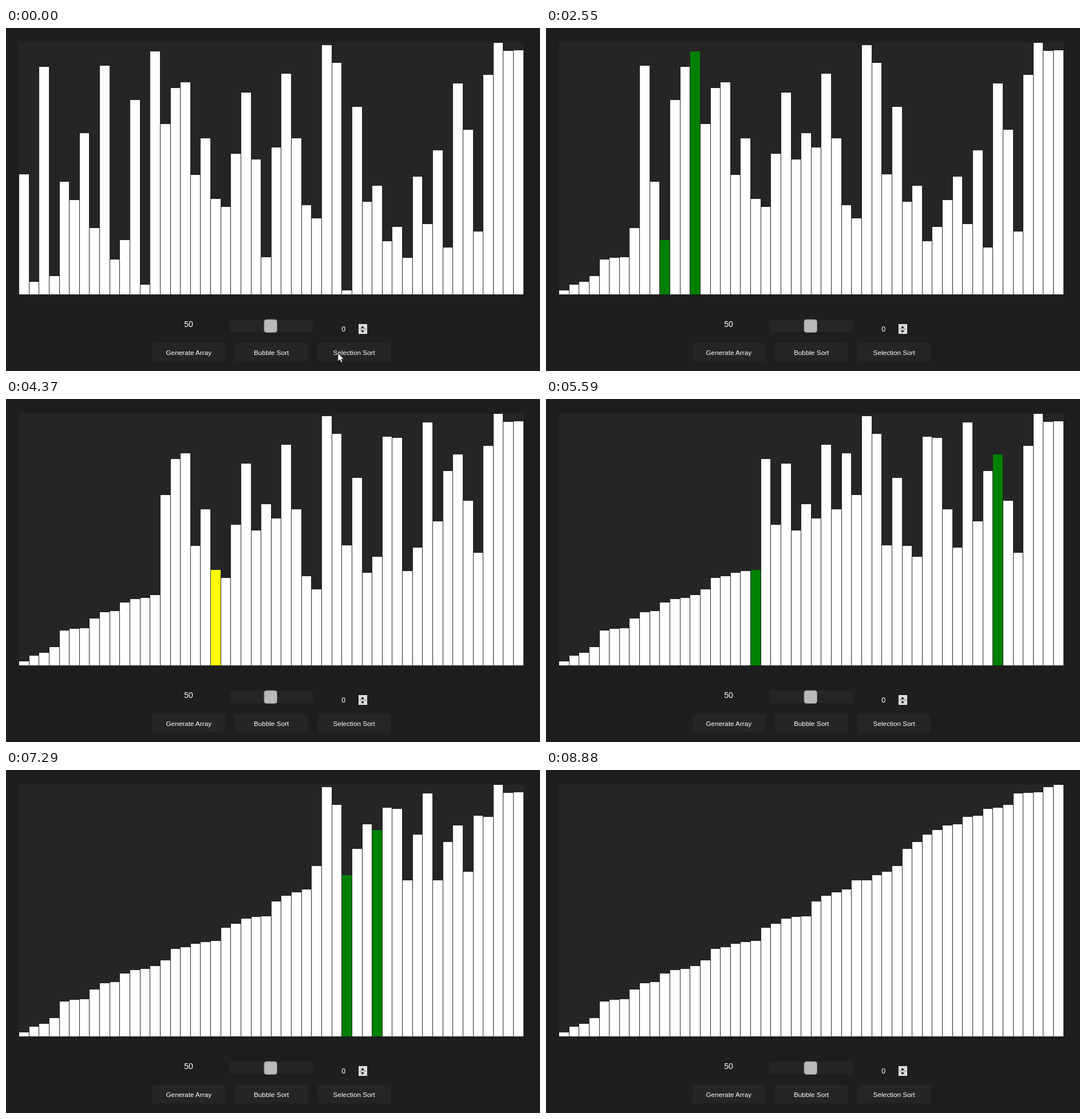
An HTML page that plays this animation: 933 by 600 pixels, repeating every 9080 ms.

```html
<!DOCTYPE html>
<html lang="en">
<head>
<meta charset="utf-8">
<title>Selection sort</title>
<style>
  html, body { margin: 0; width: 100%; height: 100%; overflow: hidden; background: #1e1e1e; }
  svg { display: block; width: 933px; height: 600px; }
  text { font-family: "Liberation Sans", Arial, sans-serif; font-size: 11.76px; fill: #fff; text-anchor: middle; }
  .crisp { shape-rendering: crispEdges; }
</style>
</head>
<body>
<svg viewBox="0 0 933 600">
  <rect width="933" height="600" fill="#1e1e1e"/>
  <g class="crisp" fill="#252525">
    <rect x="23" y="25" width="882" height="441"/>
    <rect x="391" y="510" width="145" height="22"/>
    <rect x="256" y="551" width="127" height="32"/>
    <rect x="400" y="551" width="127" height="32"/>
    <rect x="545" y="551" width="127" height="32"/>
  </g>
  <g id="bars" class="crisp"></g>

  <text x="319" y="523" style="font-size:14.1px">50</text>
  <rect x="451" y="510" width="22.5" height="22.5" rx="4" fill="#bababa" stroke="#858585"/>
  <text x="589.7" y="531" style="font-size:12.5px">0</text>

  <g class="crisp">
    <rect x="616" y="518" width="15" height="17" fill="#f0f0f0"/>
    <rect x="617" y="519" width="13" height="15" fill="#d8d8d8"/>
    <rect x="617" y="526" width="13" height="1" fill="#8a8a8a"/>
  </g>
  <path d="M620 525L623 521L626 525ZM620 529L623 533L626 529Z" fill="#111"/>

  <text x="319.3" y="572">Generate Array</text>
  <text x="463.7" y="572">Bubble Sort</text>
  <text x="608.2" y="572">Selection Sort</text>
  <path id="cursor" d="M580 568.5V583L583.3 580L585.7 585.2L588 584.2L585.7 579.2H590.2Z"
        fill="#fff" stroke="#111" stroke-width=".7"/>
</svg>
<script>
const LOOP = 9080, START = 230, END = 8880, BASE = 466;

// Top edge of each bar before sorting
const tops = [
  256, 444, 68, 434, 269, 301, 184, 350, 66, 405,
  371, 126, 449, 41, 168, 105, 95, 257, 193, 299,
  313, 220, 113, 230, 401, 209, 80, 193, 310, 333,
  30, 61, 459, 138, 304, 276, 373, 348, 402, 260,
  343, 214, 384, 97, 178, 356, 82, 26, 40, 39
];
const count = tops.length;

// Every visible state of the sort
function record(list) {
  const a = list.slice(), out = [];
  const add = (kind, i, j, marks) => out.push({ kind, i, j, marks, a: a.slice() });
  for (let i = 0; i < count - 1; i++) {
    let min = i;
    for (let j = i + 1; j < count; j++) {
      add("compare", i, j, { [min]: "#008000", [j]: "#008000" });
      if (a[j] > a[min]) {
        min = j;
        add("found", i, j, { [j]: "#ffff00" });
      }
    }
    [a[i], a[min]] = [a[min], a[i]];
    add("swap", i, min, {});
  }
  return out;
}
const steps = record(tops);
const idle = { marks: {}, a: tops };
const last = steps.length - 1;
const find = (kind, i, j) => steps.findIndex(s => s.kind === kind && s.i === i && s.j === j);

// Pace: time, screen refreshes since the previous knot, step reached
const knots = [
  [START, 0, 0],
  [1270, 16, find("compare", 2, 47)],
  [2550, 20, find("compare", 7, 13)],
  [4370, 28, find("found", 14, 19)],
  [5590, 19, find("compare", 19, 43)],
  [7290, 26, find("compare", 29, 35)],
  [END, 25, last]
];

function stepAt(t) {
  if (t < START) return idle;
  if (t >= END) return steps[last];
  const n = knots.findIndex(k => t < k[0]);
  const [t0, , s0] = knots[n - 1], [t1, ticks, s1] = knots[n];
  const tick = Math.floor((t - t0) / (t1 - t0) * ticks + 1e-6);
  return steps[Math.round(s0 + (s1 - s0) * tick / ticks)];
}

const group = document.getElementById("bars");
const cursor = document.getElementById("cursor");
const left = i => Math.round(23 + 17.634 * i);
const bars = tops.map((_, i) => {
  const r = document.createElementNS("http://www.w3.org/2000/svg", "rect");
  r.setAttribute("x", left(i));
  r.setAttribute("width", left(i + 1) - left(i) - 1);
  return group.appendChild(r);
});

let shown = null;
function draw(t) {
  cursor.style.display = t < START + 65 ? "" : "none";
  cursor.setAttribute("transform", `translate(0 ${t < START ? 0 : 9})`);
  const step = stepAt(t);
  if (step === shown) return;
  shown = step;
  bars.forEach((r, i) => {
    r.setAttribute("y", step.a[i]);
    r.setAttribute("height", BASE - step.a[i]);
    r.setAttribute("fill", step.marks[i] || "#fff");
  });
}

const begin = performance.now();
function loop() {
  draw((performance.now() - begin) % LOOP);
  requestAnimationFrame(loop);
}
loop();
</script>
</body>
</html>
```
